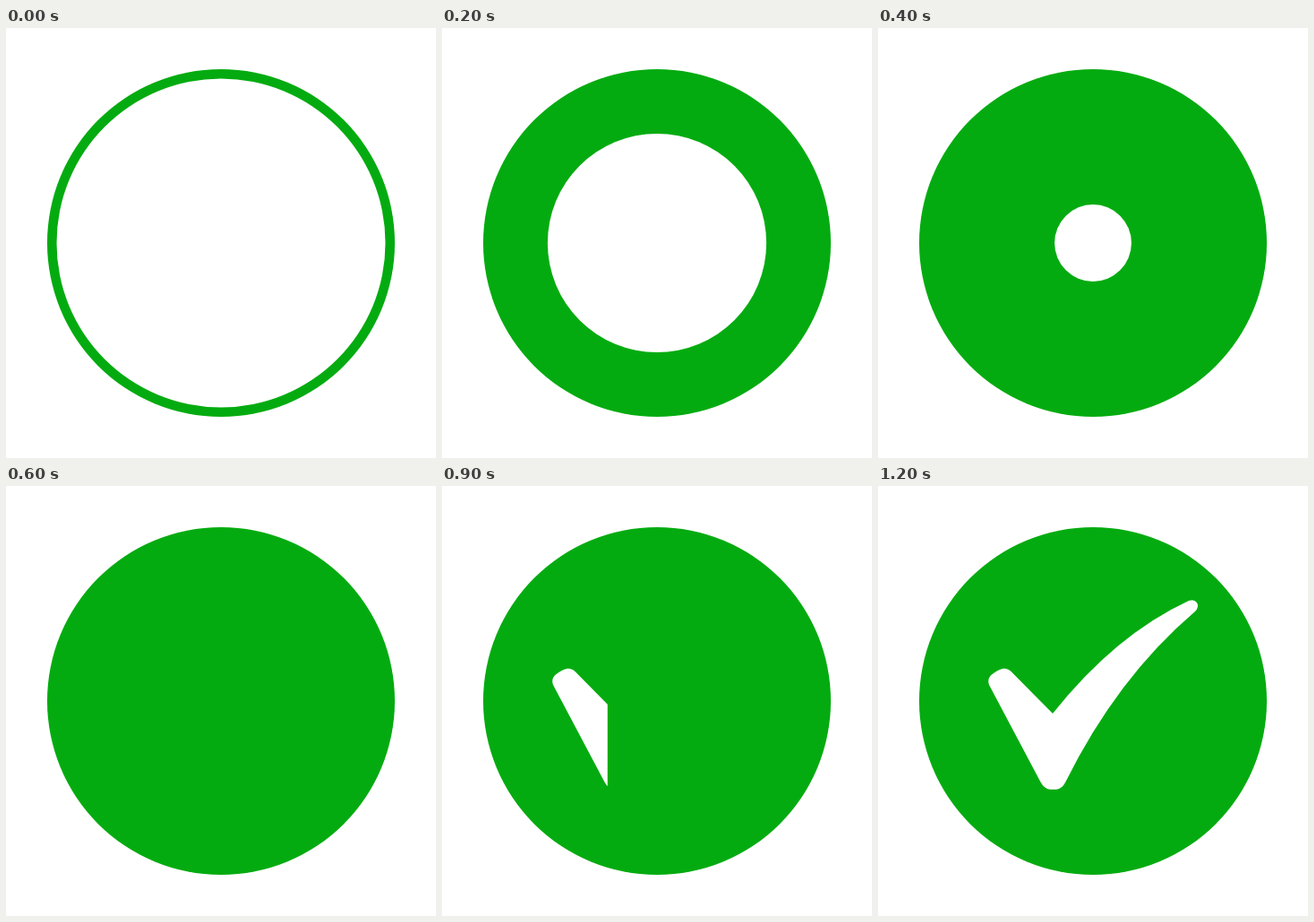
An HTML page that plays this animation: 480x480 px, repeating every 1.3 s.

```html
<!DOCTYPE html>
<html lang="en">
<head>
<meta charset="utf-8">
<title>Check mark</title>
<style>
  html, body { margin: 0; width: 100%; height: 100%; overflow: hidden; background: #fff; }
  svg { display: block; width: 100%; height: 100%; }
</style>
</head>
<body>
<svg viewBox="0 0 480 480">
  <defs>
    <clipPath id="wipe"><rect id="reveal" width="0" height="480"/></clipPath>
  </defs>
  <circle cx="240" cy="240" r="194" fill="#04ab10"/>
  <circle id="hole" cx="240" cy="240" r="183.5" fill="#fff"/>
  <path clip-path="url(#wipe)" fill="#fff" d="M124 222
    Q121.500 215 127 210.500 Q133 205.500 140 203.800 Q145 203.500 149 207.500
    L195 254 Q265 166 347 128
    C353 126 358 130 356.800 135 Q356.500 137.500 354 140
    Q267 214 209 331 Q205.500 338 199 338.700 L192 338.700 Q185.500 338 181.500 330.500 Z"/>
</svg>
<script>
  const STEP = 100, STEPS = 13;
  const hole = document.getElementById("hole");
  const reveal = document.getElementById("reveal");

  // The hole closes at a steady rate from a thin opening ring.
  const holeRadius = n => n > 5 ? 0 : Math.min(183.5, 201.3 - 39.6 * n);
  // The mark is wiped in from the left, then completed on the last step.
  const wipeEdge = n => n < 8 ? 0 : n === STEPS - 1 ? 480 : 140.8 + 44 * (n - 8);

  function draw(now) {
    const n = Math.floor(now / STEP) % STEPS;
    hole.setAttribute("r", holeRadius(n));
    reveal.setAttribute("width", wipeEdge(n));
  }

  const start = performance.now();
  function tick() {
    draw(performance.now() - start);
    requestAnimationFrame(tick);
  }
  tick();
</script>
</body>
</html>
```
